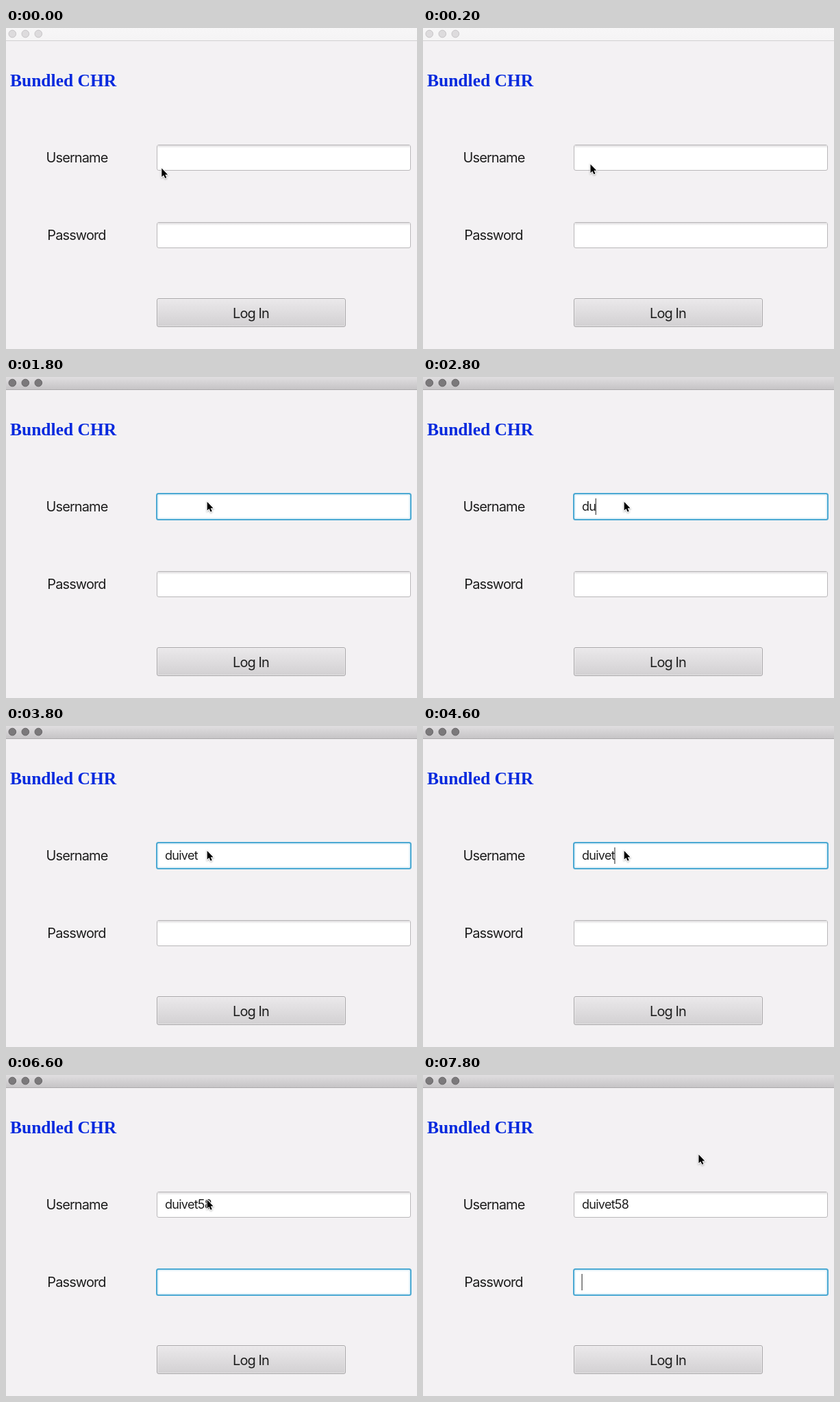
Animation, 600 px wide and 468 px high, one loop 8000 ms. Source, as an HTML page:

```html
<!DOCTYPE html>
<html lang="en">
<head>
<meta charset="utf-8">
<title>Log in</title>
<style>
  html, body { margin: 0; width: 100%; height: 100%; overflow: hidden; background: #f3f1f3; }
  svg { display: block; width: 600px; height: 468px; }
  text { font-family: Inter, "Noto Sans", sans-serif; font-size: 20px; letter-spacing: -.045em; fill: #1e1e1e; }
  .label { text-anchor: middle; }
  .heading { font: bold 25.5px "Liberation Serif", "Noto Serif", serif; letter-spacing: 0; fill: #0529de; }
  #typed { font-size: 18px; letter-spacing: -.04em; }

  .bar { fill: url(#barIdle); }
  .barLine { fill: #d2d0d2; }
  .light { fill: #dddbdd; stroke: #c6c4c6; }
  .active .bar { fill: url(#barActive); }
  .active .barLine { fill: #aba9ab; }
  .active .light { fill: #7b797b; stroke: #666466; }

  .frame { fill: #fff; stroke: #b9b7b9; }
  .shade { fill: url(#inset); }
  .ring, .glow { fill: none; stroke-width: 2; visibility: hidden; }
  .ring { stroke: #4ba9d3; }
  .glow { stroke: #e3f2f9; }
  .focused .shade { visibility: hidden; }
  .focused .ring, .focused .glow { visibility: visible; }
  #caret { fill: #444; }
  #pointer { filter: drop-shadow(0 1px 1px rgba(0, 0, 0, .3)); }
</style>
</head>
<body>
<svg id="stage" viewBox="0 0 600 468">
  <defs>
    <linearGradient id="barIdle" x2="0" y2="1">
      <stop stop-color="#f7f6f7"/><stop offset="1" stop-color="#f5f4f5"/>
    </linearGradient>
    <linearGradient id="barActive" x2="0" y2="1">
      <stop stop-color="#e0dee0"/><stop offset="1" stop-color="#c6c4c6"/>
    </linearGradient>
    <linearGradient id="buttonFill" x2="0" y2="1">
      <stop stop-color="#ebe9eb"/><stop offset="1" stop-color="#d2d0d2"/>
    </linearGradient>
    <linearGradient id="inset" x2="0" y2="1">
      <stop stop-color="#dddbdd"/><stop offset="1" stop-color="#fff"/>
    </linearGradient>
    <g id="box">
      <rect class="frame" x=".5" y=".5" width="370" height="37" rx="2.5"/>
      <rect class="shade" x="1" y="1" width="369" height="4"/>
      <rect class="glow" x="2" y="2" width="367" height="34" rx="1.5"/>
      <rect class="ring" width="371" height="38" rx="2.5"/>
    </g>
  </defs>

  <rect width="600" height="468" fill="#f3f1f3"/>
  <rect class="bar" width="600" height="18"/>
  <rect class="barLine" y="18" width="600" height="1"/>
  <circle class="light" cx="9.3" cy="8.5" r="5.3"/>
  <circle class="light" cx="28.3" cy="8.5" r="5.3"/>
  <circle class="light" cx="47.3" cy="8.5" r="5.3"/>

  <text class="heading" x="6" y="85">Bundled CHR</text>
  <text class="label" x="103.5" y="196">Username</text>
  <text class="label" x="103" y="309">Password</text>

  <g id="username" transform="translate(220 170)"></g>
  <g id="password" transform="translate(220 283)"></g>
  <text id="typed" x="232" y="195"></text>
  <rect id="caret" width="1.2" height="24"/>

  <rect x="220.5" y="394.5" width="275" height="41" rx="2.5" fill="url(#buttonFill)" stroke="#a9a7a9"/>
  <rect x="221.5" y="395.5" width="273" height="39" rx="1.5" fill="none" stroke="#fff" stroke-opacity=".35"/>
  <text class="label" x="357.5" y="422.5">Log In</text>

  <path id="pointer" d="M0 0V12.6L2.8 10L5 14.6L7 13.7L5 9.2H8.8Z"
        stroke="#fff" stroke-width="1.8" paint-order="stroke"/>
</svg>
<script>
  const LOOP = 8000, STEP = 200;
  const NAME = "duivet58";
  const KEY_TIMES = [2600, 2800, 3000, 3100, 3200, 3200, 5000, 5200];
  const USER_FOCUS = 800, PASSWORD_FOCUS = 5800;
  // [time, x, y] of the pointer tip
  const PATH = [[0, 227.3, 204.5], [600, 293.7, 182], [6600, 293.7, 182], [7200, 402.5, 116], [LOOP, 402.5, 116]];

  const [stage, username, password, typed, caret, pointer] =
    ["stage", "username", "password", "typed", "caret", "pointer"].map(id => document.getElementById(id));

  // Separate copies, so that each field can take its own focus style
  for (const field of [username, password])
    for (const part of document.getElementById("box").children) field.append(part.cloneNode());

  const ease = p => p * p * (3 - 2 * p);

  function pointerAt(t) {
    const i = PATH.findIndex(p => p[0] > t);
    const [t0, x0, y0] = PATH[i - 1], [t1, x1, y1] = PATH[i];
    const p = ease((t - t0) / (t1 - t0));
    return [x0 + (x1 - x0) * p, y0 + (y1 - y0) * p];
  }

  function draw(now) {
    const t = Math.floor(now % LOOP / STEP) * STEP;
    const inPassword = t >= PASSWORD_FOCUS;
    const inUsername = t >= USER_FOCUS && !inPassword;
    stage.classList.toggle("active", t >= USER_FOCUS);
    username.classList.toggle("focused", inUsername);
    password.classList.toggle("focused", inPassword);

    const keys = KEY_TIMES.filter(k => k <= t);
    typed.textContent = NAME.slice(0, keys.length);

    // Every key or change of focus restarts the blink
    const blinkStart = inPassword ? PASSWORD_FOCUS : Math.max(USER_FOCUS + STEP, ...keys);
    const lit = t >= blinkStart && (t - blinkStart) % 1000 < 500;
    caret.style.visibility = lit ? "visible" : "hidden";
    const advance = inPassword || !keys.length ? 0 : typed.getComputedTextLength();
    caret.setAttribute("x", 231.5 + advance);
    caret.setAttribute("y", inPassword ? 290 : 177);

    pointer.setAttribute("transform", `translate(${pointerAt(t)})`);
  }

  function tick() {
    draw(performance.now());
    requestAnimationFrame(tick);
  }
  tick();
</script>
</body>
</html>
```
